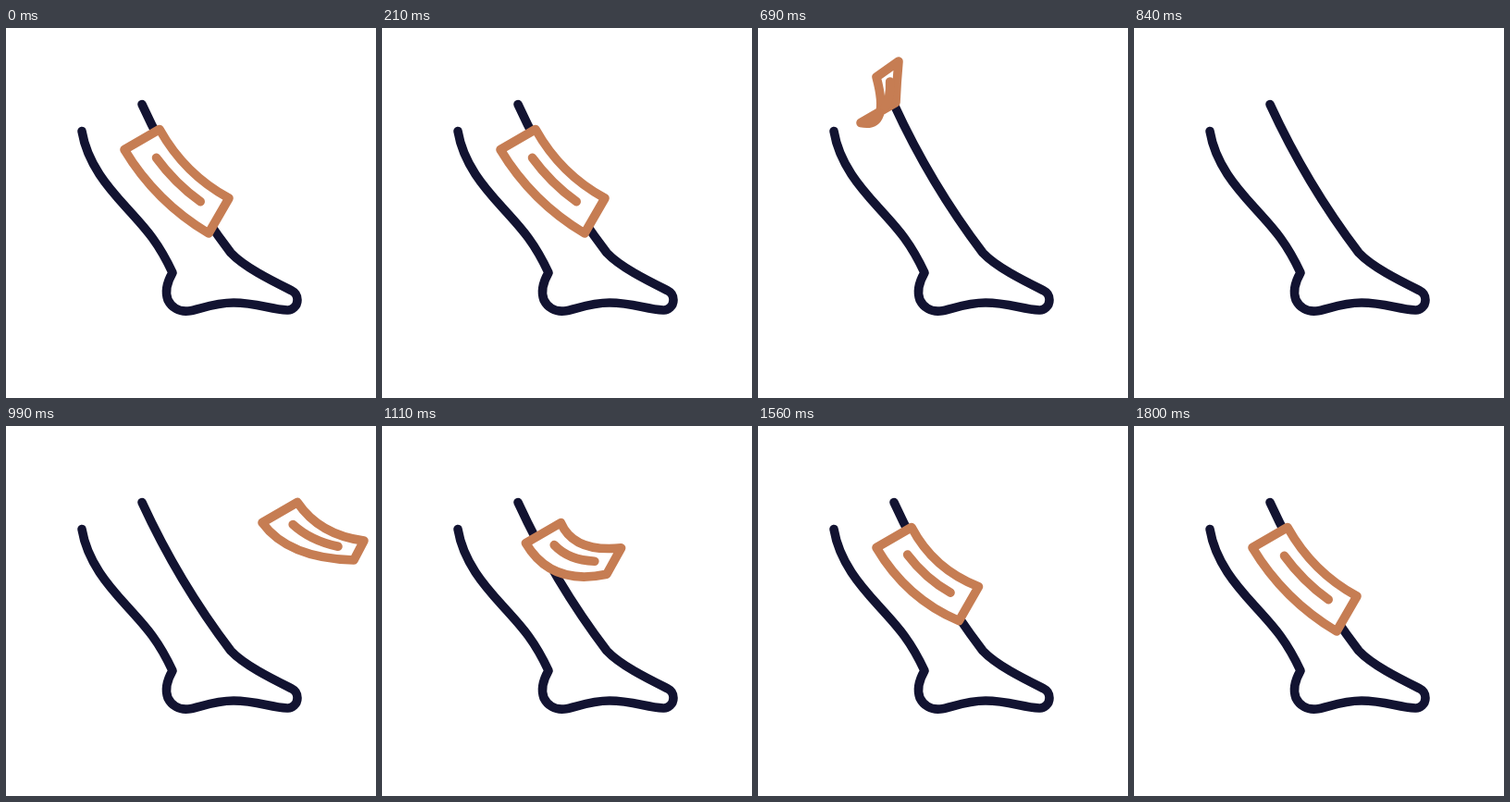
Recreate the animation shown at these times as an HTML page with a canvas. Size 400 px wide and 400 px high, loop 1830 ms.

```html
<!DOCTYPE html>
<html lang="en">
<head>
<meta charset="utf-8">
<title>Leg patch</title>
<style>
html, body { margin: 0; width: 100%; height: 100%; overflow: hidden; background: #fff; }
canvas { display: block; width: 400px; height: 400px; }
</style>
</head>
<body>
<canvas id="stage"></canvas>
<script>
const STEP = 30, LOOP = 1830;
const canvas = document.getElementById('stage');
const ctx = canvas.getContext('2d');
const ratio = window.devicePixelRatio || 1;
canvas.width = canvas.height = 400 * ratio;
ctx.scale(ratio, ratio);

const leg = new Path2D(
  'M82 111.5C88 147 110.5 172.5 130.5 194.5C148.5 214.5 163.5 229 180 264.5' +
  'C174 275 172 286 175 294C179 302 187 307 197 306C207 305 224 297 246 297' +
  'C270 297 286 304 304 305C309 305.5 315 301 315 294C315 290 313 286 309 284' +
  'C289 274 258 259 243 243C205 193 173 139 147 82.5');

// The top edge keeps its shape; a pose sets the far corners and the bend of each side.
const topLeft = [128, 131.5], topRight = [166, 109.5];
const pose = (left, right, bendLeft, bendRight) => [left, right, bendLeft, bendRight];
const rest = pose([219, 222], [241, 184], [162, 188], [193, 158]);
const lean = pose([198, 219], [226, 190], [155, 181], [189, 155]);
const curl = pose([145, 82], [169, 65], [160, 138], [167, 87]);
const drag = pose([227, 172], [238, 151], [156, 170], [190, 145]);
const swing = pose([210, 162], [228, 130], [155, 182], [175, 140.5]);

const clamp = x => Math.min(1, Math.max(0, x));
const easeIn = x => x * x;
const easeOut = x => 1 - (1 - x) ** 2.2;
const linear = x => x;
const mix = (a, b, t) => a.map((v, i) => v + (b[i] - v) * t);

function blend(from, to, f, start, end, ease) {
  const t = ease(clamp((f - start) / (end - start)));
  return from.map((p, i) => mix(p, to[i], t));
}

function shape(f) {
  if (f < 16) return blend(rest, lean, f, 10, 16, easeIn);
  if (f < 29) return blend(lean, curl, f, 16, 23, linear);
  if (f < 43) return blend(drag, swing, f, 33, 43, easeOut);
  return blend(swing, rest, f, 43, 60, easeOut);
}

// Speeds away to the upper left, then slows down coming in from the right.
function offset(f) {
  if (f < 29) {
    const k = (Math.max(0, f - 19.83) / 3.17) ** 2;
    return [-17 * k, -29 * k];
  }
  const k = (Math.max(0, 40 - f) / 7) ** 2;
  return [149 * k, -27 * k];
}

function drawStripe(a, b, c, t0, t1) {
  const at = (s, t) => mix(mix(a, b, s), mix(b, c, s), t);
  ctx.beginPath();
  ctx.moveTo(...at(t0, t0));
  ctx.quadraticCurveTo(...at(t0, t1), ...at(t1, t1));
  ctx.stroke();
}

function drawPatch(f) {
  const [left, right, bendLeft, bendRight] = shape(f);
  ctx.save();
  ctx.translate(...offset(f));
  ctx.strokeStyle = '#c67d53';
  ctx.beginPath();
  ctx.moveTo(...topLeft);
  ctx.quadraticCurveTo(...bendLeft, ...left);
  ctx.lineTo(...right);
  ctx.quadraticCurveTo(...bendRight, ...topRight);
  ctx.closePath();
  ctx.fill();
  ctx.stroke();
  const middle = (a, b) => mix(a, b, 0.55);
  drawStripe(middle(topLeft, topRight), middle(bendLeft, bendRight), middle(left, right), 0.21, 0.79);
  ctx.restore();
}

function draw(time) {
  const f = Math.floor((time % LOOP) / STEP);
  ctx.fillStyle = '#fff';
  ctx.fillRect(0, 0, 400, 400);
  ctx.lineWidth = 9.6;
  ctx.lineCap = ctx.lineJoin = 'round';
  ctx.strokeStyle = '#121331';
  ctx.stroke(leg);
  drawPatch(f);
}

const start = performance.now();
function tick() {
  draw(performance.now() - start);
  requestAnimationFrame(tick);
}
tick();
</script>
</body>
</html>
```
